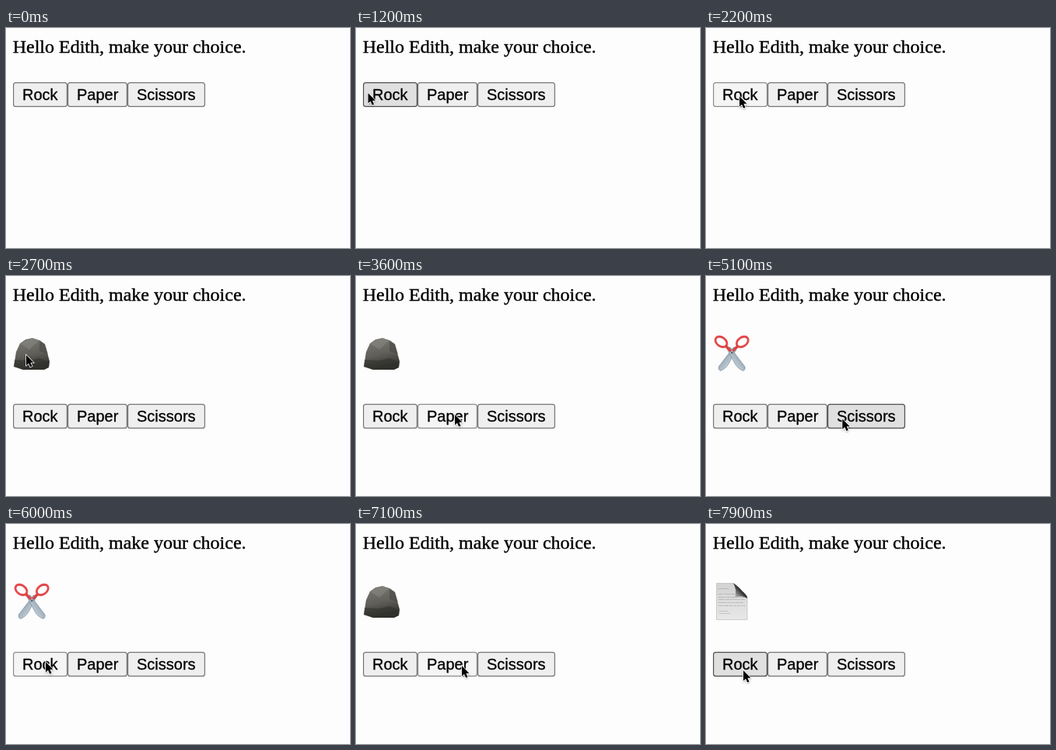
These frames come from a looping animation (442 by 284 pixels, 8000 ms). An HTML page:

```html
<!DOCTYPE html>
<html lang="en">
<head>
<meta charset="utf-8">
<title>Make your choice</title>
<style>
html, body { margin: 0; width: 100%; height: 100%; overflow: hidden; background: #fdfdfd; }
svg { display: block; width: 442px; height: 284px; }
.greeting { font: 24px "Liberation Serif", Times, serif; stroke: #000; stroke-width: 0.4; }
.button text { font: 20px "Liberation Sans", Arial, sans-serif; stroke: #000; stroke-width: 0.3; }
.button rect { fill: #efefef; stroke: #767676; stroke-width: 1.2; }
.button.hover rect { fill: #e0e0e0; stroke: #4f4f4f; }
.button.active rect { fill: #f5f5f5; stroke: #8d8d8d; }
.letter { font: 2.7px "Liberation Serif", Times, serif; fill: #777; }
</style>
</head>
<body>
<svg viewBox="0 0 442 284">
  <defs>
    <linearGradient id="stone" x1="0" y1="0" x2="0.25" y2="1">
      <stop offset="0" stop-color="#7d7c77"/>
      <stop offset="0.6" stop-color="#5f5e59"/>
      <stop offset="1" stop-color="#363632"/>
    </linearGradient>
    <linearGradient id="sheet" x1="0" y1="0" x2="0" y2="1">
      <stop offset="0" stop-color="#d2d2d2"/>
      <stop offset="1" stop-color="#e8e8e8"/>
    </linearGradient>
    <linearGradient id="curl" x1="0.1" y1="0.9" x2="0.55" y2="0.45">
      <stop offset="0" stop-color="#c4c4c4"/>
      <stop offset="0.5" stop-color="#777"/>
      <stop offset="1" stop-color="#262626"/>
    </linearGradient>
    <linearGradient id="steel" x1="0" y1="0.6" x2="0.6" y2="0">
      <stop offset="0" stop-color="#d3dee6"/>
      <stop offset="0.6" stop-color="#a4b4c0"/>
      <stop offset="1" stop-color="#647480"/>
    </linearGradient>
    <filter id="shade" x="-50%" y="-50%" width="200%" height="200%">
      <feDropShadow dx="0" dy="1" stdDeviation="0.8" flood-opacity="0.35"/>
    </filter>
    <g id="blade">
      <path d="M26 92 L31 92 L50 117 Q51 121 48 122.5 Q41 120 37 113 Z" fill="url(#steel)" stroke="#75838d" stroke-width="0.6"/>
      <ellipse cx="19.5" cy="85" rx="8.2" ry="5.8" transform="rotate(36 19.5 85)" fill="none" stroke="#e5484a" stroke-width="2.8"/>
      <path d="M26 91 L31 96" stroke="#dc4345" stroke-width="3.4" stroke-linecap="round"/>
    </g>
  </defs>

  <text class="greeting" x="8.7" y="32">Hello Edith, make your choice.</text>

  <g id="Rock">
    <path d="M10 117 L13 98 L18 87 L25 82 L34 80 L43 83 L50 88 L56 110 L55 118 L49 121 H22 Z" fill="url(#stone)"/>
    <path d="M18 87 L34 80 L43 83 L30 95 Z" fill="#8b8a84" opacity="0.5"/>
    <path d="M43 83 L50 88 L54 101 L43 97 Z" fill="#494843" opacity="0.6"/>
    <path d="M11 108 L30 109 L43 106 L56 111 L55 118 L49 121 H22 L10 117 Z" fill="#292925" opacity="0.45"/>
  </g>

  <g id="Paper">
    <path d="M13.5 76.5 H36 Q41 86 53 93 V123.5 H13.5 Z" fill="url(#sheet)" stroke="#c2c2c2" stroke-width="0.8"/>
    <g id="lines"></g>
    <path d="M35 76.5 Q40 84 37 95 Q46 91 53 96 Q53 92 47 87 Q40 79 35 76.5 Z" fill="url(#curl)"/>
  </g>

  <g id="Scissors">
    <use href="#blade" transform="matrix(-1 0 0 1 66.3 0)"/>
    <use href="#blade"/>
    <circle cx="33.2" cy="99" r="1.3" fill="#59646c"/>
  </g>

  <g id="buttons"></g>

  <path id="cursor" d="M0 0 V13.4 L3 10.7 L5.2 15.6 L7.6 14.5 L5.4 9.8 H9.5 Z" stroke="#fff" stroke-width="1.4" paint-order="stroke" filter="url(#shade)"/>
</svg>
<script>
const LOOP = 8000, STEP = 100, PRESS = 200;
const LEFT = 9, TOP = 70, HEIGHT = 32, PADDING = 12, PICTURE_ROW = 95;
const byId = id => document.getElementById(id);

// The pointer rests at each stop until its click, or leaves at once.
const stops = [
  { arrive: 800, x: -4, y: 81 },
  { arrive: 1700, x: 43, y: 88, click: 2300, pick: "Rock" },
  { arrive: 2700, x: 26, y: 102 },
  { arrive: 3100, x: 127, y: 179, click: 3800, pick: "Paper" },
  { arrive: 4300, x: 206, y: 186, click: 4900, pick: "Scissors" },
  { arrive: 5600, x: 51, y: 178, click: 6100, pick: "Rock" },
  { arrive: 6700, x: 136, y: 183, dip: 40, click: 7200, pick: "Paper" },
  { arrive: 7900, x: 48, y: 189, dip: 55 }
];
const labels = ["Rock", "Paper", "Scissors"];

let edge = LEFT;
const buttons = labels.map(label => {
  byId("buttons").insertAdjacentHTML("beforeend",
    `<g class="button"><rect x="${edge + 0.6}" y="${TOP + 0.6}" height="${HEIGHT - 1.2}" rx="3"/>` +
    `<text x="${edge + PADDING}" y="${TOP + 23}">${label}</text></g>`);
  const node = byId("buttons").lastElementChild;
  const width = Math.round(node.lastChild.getComputedTextLength()) + 2 * PADDING;
  node.firstChild.setAttribute("width", width - 1.2);
  const x = edge;
  edge += width;
  return { x, width, node };
});

const phrases = ["Dear friend,", "", "Here is a short note about the", "game we play when it is raining",
  "outside. Each of us picks a sign", "and shows it at the same time.", "Paper wraps the rock, and so on.", "", "Yours truly,", "A good player"];
byId("lines").innerHTML = phrases.map((line, i) =>
  `<text class="letter" x="16" y="${84 + i * 3.6}">${line}</text>`).join("");

function pointerAt(time) {
  const index = stops.findIndex(stop => stop.arrive > time);
  if (index < 0) return stops.at(-1);
  const from = stops[index - 1], to = stops[index];
  if (!from) return { x: -50, y: -50 };
  const leave = from.click ?? from.arrive;
  const p = Math.max(0, (time - leave) / (to.arrive - leave));
  const ease = p * p * (3 - 2 * p);
  return {
    x: from.x + (to.x - from.x) * ease,
    y: from.y + (to.y - from.y) * ease + (to.dip ?? 0) * Math.sin(Math.PI * ease)
  };
}

function draw(time) {
  const choice = stops.findLast(stop => time >= stop.click)?.pick;
  const pressed = stops.some(({ click }) => time >= click - PRESS && time < click);
  const shift = choice ? PICTURE_ROW : 0;
  const { x, y } = pointerAt(time);

  labels.forEach(id => byId(id).style.display = id === choice ? "" : "none");
  byId("buttons").setAttribute("transform", `translate(0 ${shift})`);
  byId("cursor").setAttribute("transform", `translate(${x} ${y})`);
  for (const button of buttons) {
    const over = x >= button.x && x < button.x + button.width && y >= TOP + shift && y < TOP + HEIGHT + shift;
    button.node.setAttribute("class", "button" + (over ? pressed ? " active" : " hover" : ""));
  }
}

const start = performance.now();
function tick() {
  const time = (performance.now() - start) % LOOP;
  draw(Math.floor(time / STEP) * STEP);
  requestAnimationFrame(tick);
}
tick();
</script>
</body>
</html>
```
